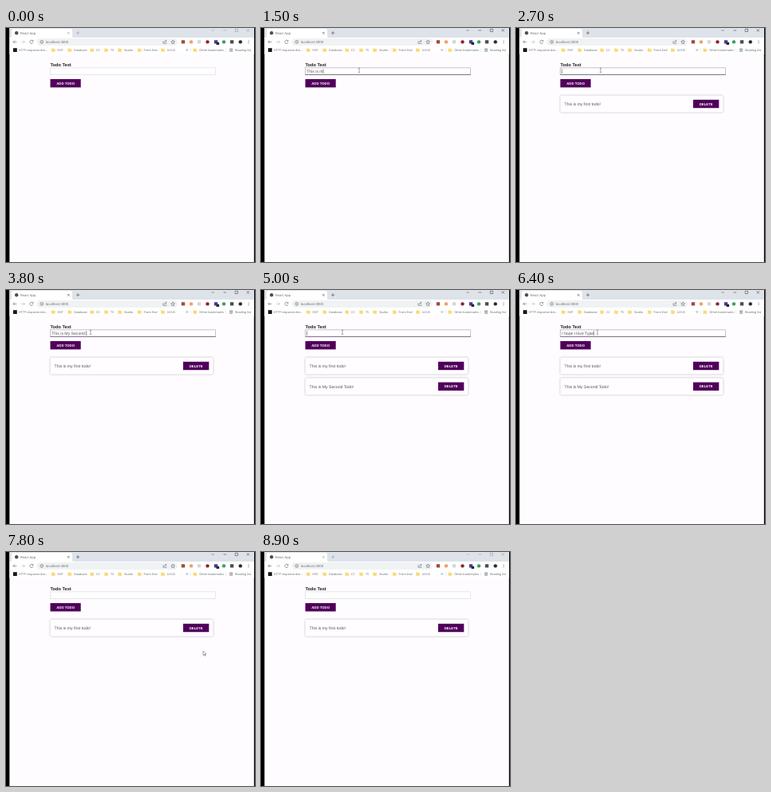
Animation of 312x293 px, one loop 9 s. Source, as an HTML page:

```html
<!DOCTYPE html>
<html lang="en">
<head>
<meta charset="utf-8">
<title>Todo list</title>
<style>
  html, body { margin: 0; width: 100%; height: 100%; overflow: hidden; background: #000; }
  svg { display: block; width: 100%; height: 100%; }
  text { text-rendering: geometricPrecision; white-space: pre; }
  .ui { font: 4.1px "Open Sans", "Noto Sans", sans-serif; fill: #5f6368; }
  .page { font: 5.12px "Liberation Sans", Arial, sans-serif; fill: #55505a; }
  .label { font-size: 5.65px; font-weight: bold; fill: #1c1a1e; }
  .button text { font: bold 4.3px "Liberation Sans", Arial, sans-serif; fill: #fff; text-anchor: middle; }
  .button rect { fill: #50005a; }
  .button.hover rect { fill: #6a0a77; }
  .card { fill: #fffdff; filter: drop-shadow(0 .6px 1.3px rgba(0, 0, 0, .3)); }
  .line { fill: none; stroke: #5f6368; stroke-width: .6; }
  #caption { stroke: #45484c; }
  #caption.idle { stroke: #9a9da2; }
</style>
</head>
<body>
<svg viewBox="0 0 312 293" preserveAspectRatio="none">
  <rect width="312" height="293"/>
  <rect x="4.4" width="306.4" height="293" fill="#fefcff"/>
  <rect x="4.4" width="306.4" height="13" fill="#dee2e9"/>
  <path d="M5 12.2q2 0 2-2V3q0-2 2-2h72q2 0 2 2v7.2q0 2 2 2z" fill="#fff"/>
  <rect x="4.4" y="12" width="306.4" height="20.6" fill="#fff"/>
  <rect x="38.5" y="13" width="176.5" height="9" rx="4.5" fill="#f0f2f4"/>

  <circle cx="13.2" cy="6.2" r="2.2" fill="#4b4e52"/>
  <text class="ui" x="18" y="7.7" font-size="4">React App</text>
  <g id="caption" class="line">
    <path d="M77 5l2.6 2.6m0-2.6L77 7.6M88 6.2h4.2m-2.1-2.1v4.2"/>
    <path d="M257.6 2.2l1.5 1.5 1.5-1.5M272.5 3h3.6M287.2 1.3h3.3v3.3h-3.3zM301.6 1.3l3.3 3.3m0-3.3l-3.3 3.3"/>
  </g>
  <g class="line">
    <path d="M13.5 17.4H9m2-2l-2 2 2 2"/>
    <path d="M19 17.4h4.5m-2-2l2 2-2 2" stroke="#b5b8bc"/>
    <path d="M33.8 16.3a2.1 2.1 0 1 0 .2 1.8M34 15v1.6h-1.6"/>
    <circle cx="44.8" cy="17.4" r="1.9"/>
    <path d="M44.8 17.2v1.3m0-2.3v.4M197 16.3v3h3.8v-1M198.5 18q.2-2 2.3-2m-1-1.2l1.3 1.2-1.3 1.2"/>
    <path d="M209.2 15l.7 1.6 1.7.2-1.3 1.2.4 1.7-1.5-.9-1.5.9.4-1.7-1.3-1.2 1.7-.2z"/>
    <path d="M231.3 25.5v4.5M275.4 25.5v4.5" stroke="#cfd2d6" stroke-width=".5"/>
    <path d="M225.7 26.3l1 1.2-1 1.2m1.2-2.4l1 1.2-1 1.2" stroke-width=".5"/>
    <path d="M280 26h4.2M280 27.6h4.2M280 29.2h4.2" stroke-width=".7"/>
  </g>
  <text class="ui" x="49.8" y="18.9" style="font-size:4.2px">localhost:3000</text>
  <g id="extensions"></g>
  <g fill="#5f6368"><circle cx="304" cy="15.7" r=".5"/><circle cx="304" cy="17.4" r=".5"/><circle cx="304" cy="19.1" r=".5"/></g>
  <rect x="9" y="25.2" width="4.8" height="4.8" fill="#17181a"/>
  <g id="bookmarks" class="ui" style="font-size:3.75px"></g>

  <g class="page">
    <text class="label" x="55.6" y="48.4">Todo Text</text>
    <rect id="field" x="55.7" y="49.9" width="207" height="8.6" fill="#fff" stroke-width=".5"/>
    <path id="underline" d="M55.5 58.4h207.4" stroke="#5d5263" stroke-width=".7"/>
    <text id="typed" x="57.2" y="55.9"></text>
    <rect id="caret" y="51.4" width=".5" height="5.6" fill="#222"/>
    <g id="buttons"></g>
  </g>

  <g id="mouse" stroke-linejoin="round">
    <path id="beam" d="M-1.1-2.6h.8l.3.3.3-.3h.8M0-2.3v4.6M-1.1 2.6h.8l.3-.3.3.3h.8" fill="none" stroke="#333" stroke-width=".45"/>
    <path id="hand" d="M-.6.4q.6-.9 1.2 0V3l3 .7q.7.3.5 1.2L3.5 7.2H.4L-1.8 4.4q0-1 1.2-.4z" fill="#fff" stroke="#222" stroke-width=".45"/>
    <path id="arrow" d="M0 0v5.4l1.3-1.2.9 2 .9-.4-.9-1.9h1.7z" fill="#fff" stroke="#222" stroke-width=".4"/>
  </g>
</svg>
<script>
const $ = id => document.getElementById(id);
const LOOP = 9000, STEP = 100;
const add = (id, markup) => $(id).insertAdjacentHTML('beforeend', markup);

// Toolbar marks: x, colour, round?
[[222, '#a5483f'], [232, '#eda062', 1], [242, '#d5d7da'], [252.5, '#94202c', 1], [263, '#493a9c'],
 [273, '#36a066', 1], [283, '#4a4d51'], [293.7, '#2b2a2c', 1]].forEach(([x, color, round]) =>
  add('extensions', `<rect x="${x - 2.2}" y="15.2" width="4.4" height="4.4" rx="${round ? 2.2 : .4}" fill="${color}"/>`));
add('extensions', '<rect x="263.5" y="17.8" width="3.6" height="3.2" rx=".6" fill="#26262e"/>');

add('bookmarks', '<text x="15.8" y="29">HTTP response dec...</text><text x="287" y="29">Reading list</text>');
[[57, 'ENT'], [77.5, 'Database'], [105.5, 'CC'], [123.3, 'TS'], [140.3, 'Studio'], [165, 'Front End'],
 [194.2, 'UI/UX'], [234.6, 'Other bookmarks']].forEach(([x, name]) =>
  add('bookmarks', `<path d="M${x} 25.4h1.8l.6.7h2.2v3.7h-4.6z" fill="#fad978"/><text x="${x + 7.6}" y="29">${name}</text>`));

const button = (x, y, w, name) => `<g class="button" data-box="${[x, y, w]}">
  <rect x="${x}" y="${y}" width="${w}" height="10.4"/><text x="${x + w / 2}" y="${y + 6.75}">${name}</text></g>`;

// Each todo: text, typing points [time, letters], time added, time removed
const todos = [
  { text: 'This is my first todo!', typing: [[600, 0], [1600, 10], [2200, 22]], from: 2500, to: LOOP },
  { text: 'This is My Second Todo!', typing: [[2800, 0], [3800, 18], [4100, 23]], from: 4400, to: 7700 },
  { text: 'I hope i love Typescript', typing: [[5000, 0], [5500, 6], [5600, 6], [5800, 8], [5900, 8], [6700, 24]], from: 6900, to: 7400 }
];
add('buttons', button(55.5, 64, 38.2, 'ADD TODO'));
todos.forEach((todo, i) => {
  const y = 84.6 + i * 25.75;
  add('buttons', `<g><rect class="card" x="55.5" y="${y}" width="204" height="20.8" rx="1.6"/>
    <text x="60.6" y="${y + 12.2}">${todo.text}</text>${button(222, y + 5.2, 32.3, 'DELETE')}</g>`);
  todo.node = $('buttons').lastElementChild;
});
const buttons = [...document.querySelectorAll('.button')];

// Pointer path: time, x, y
const path = [[300, 170, 66], [400, 123, 53], [2300, 123, 53], [2400, 84, 69], [2500, 84, 69], [2700, 106, 53],
  [4100, 106, 53], [4300, 84, 69], [4400, 84, 69], [4600, 102, 53], [6900, 102, 53], [7000, 170, 97],
  [7200, 251.6, 151.2], [7400, 251.6, 151.2], [7600, 246, 122], [7700, 246, 122], [7800, 247, 124],
  [7900, 247, 124], [8300, 270, 224], [8500, 300, 50], [8600, 303, 15]];
const focusSpans = [[500, 2500], [2700, 4400], [4600, 7400]];

function at(points, t, k = 1) {
  const i = points.findIndex(p => p[0] > t);
  if (i < 1) return points[i ? points.length - 1 : 0][k];
  const a = points[i - 1], b = points[i];
  return a[k] + (b[k] - a[k]) * (t - a[0]) / (b[0] - a[0]);
}
const show = (node, on) => node.setAttribute('visibility', on ? 'visible' : 'hidden');

function draw(t) {
  const focused = focusSpans.some(([a, b]) => t >= a && t < b);
  $('caption').classList.toggle('idle', t < 300 || t >= 8900);
  $('field').setAttribute('stroke', focused ? '#8f8993' : '#d0cdd2');
  show($('underline'), focused);

  const draft = todos.find(todo => t < todo.from);
  $('typed').textContent = draft ? draft.text.slice(0, Math.round(at(draft.typing, t))) : '';
  const count = $('typed').textContent.length;
  $('caret').setAttribute('x', 57.3 + (count ? $('typed').getComputedTextLength() : 0));
  show($('caret'), focused && !(t >= 4800 && t < 5000));
  todos.forEach(todo => todo.node.style.display = t >= todo.from && t < todo.to ? '' : 'none');

  const x = at(path, t), y = at(path, t, 2), active = t >= 300 && t < 8600;
  let hand = false;
  for (const node of buttons) {
    const [bx, by, bw] = node.dataset.box.split(',').map(Number);
    const shown = node.parentNode.style.display !== 'none';
    const over = active && shown && x >= bx && x <= bx + bw && y >= by && y <= by + 10.4;
    node.classList.toggle('hover', over);
    hand = hand || over;
  }
  const beam = !hand && x > 55 && x < 263 && y > 49 && y < 59;
  $('mouse').setAttribute('transform', `translate(${x} ${y})`);
  show($('hand'), active && hand);
  show($('beam'), active && beam);
  show($('arrow'), active && !hand && !beam);
}

const start = performance.now();
function frame() {
  const t = (performance.now() - start) % LOOP;
  draw(Math.floor(t / STEP) * STEP);
  requestAnimationFrame(frame);
}
frame();
</script>
</body>
</html>
```
